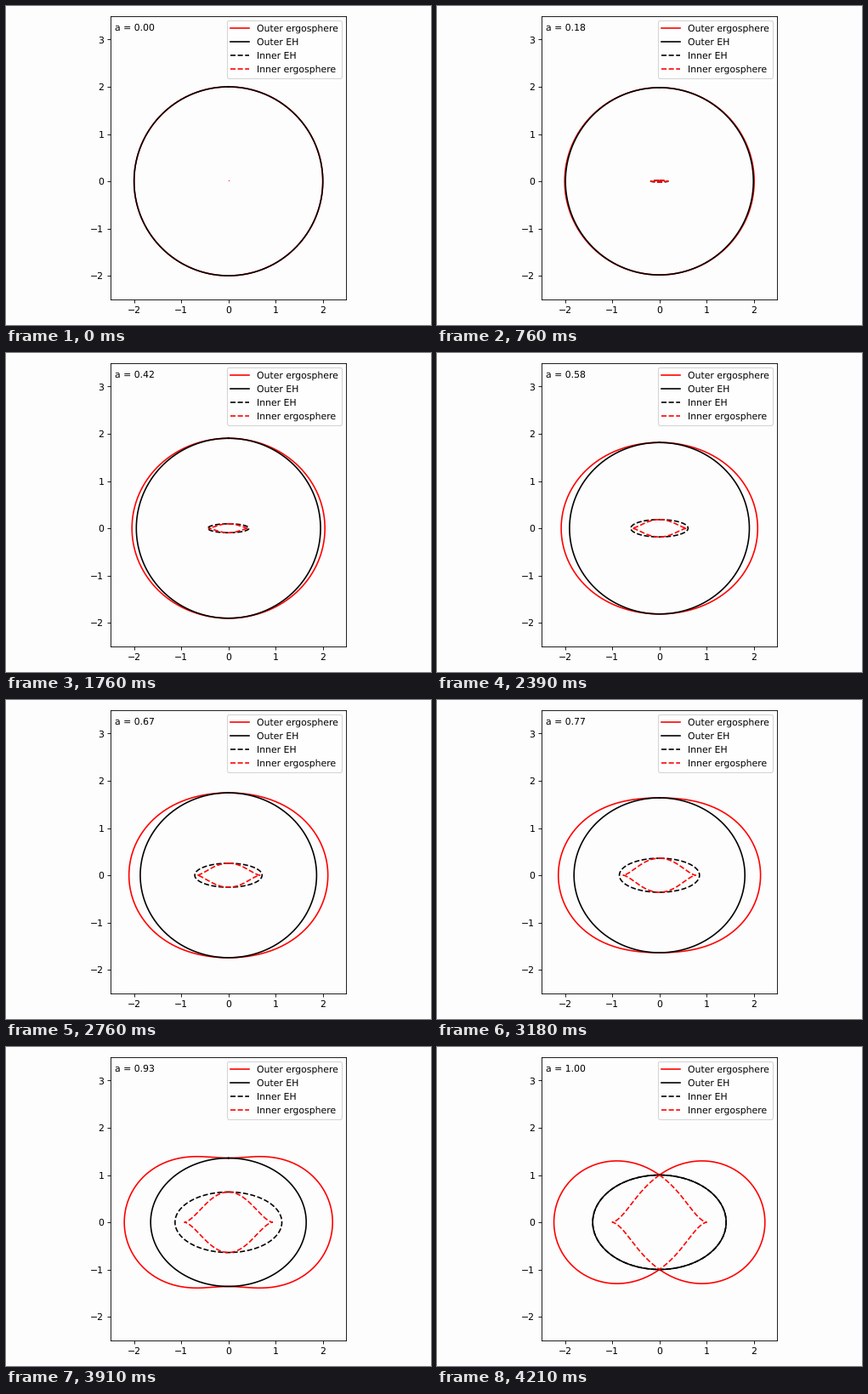
Write a matplotlib script that moves like this. It is 500 px wide and 375 px high and loops after 5000 ms.

```python
import numpy as np
import matplotlib.pyplot as plt
from matplotlib.animation import FuncAnimation

W, H, DPI = 500, 375, 78.125
LOOP_MS, INTERVAL = 5000, 20
STEP_MS = 1000 / 33  # the spin advances 33 times a second
BACKGROUND = "#fdfdfd"

plt.rcParams["text.hinting"] = "none"

theta = np.linspace(0, 2 * np.pi, 1000)

fig = plt.figure(figsize=(W / DPI, H / DPI), dpi=DPI, facecolor=BACKGROUND)
ax = fig.add_axes([122.9 / W, 30.2 / H, 277.57 / W, 333.08 / H],
                  facecolor=BACKGROUND)
ax.set_xlim(-2.5, 2.5)
ax.set_ylim(-2.5, 3.5)
ax.set_xticks(range(-2, 3))
ax.set_yticks(range(-2, 4))


def spin(step):
    """Spin rises steadily, slows a little near the end, then holds at 1."""
    return np.interp(step, [0, 112, 139], [0, 0.82, 1])


def surface(a, sign, ergo):
    """Kerr horizon or ergosphere (M = 1) in Cartesian coordinates."""
    c = np.cos(theta) if ergo else np.ones_like(theta)
    r = 1 + sign * np.sqrt(np.maximum(1 - (a * c) ** 2, 0))
    return np.hypot(r, a) * np.sin(theta), r * np.cos(theta)


# label, colour, line style, sign of the root, ergosphere or horizon
SURFACES = [
    ("Outer ergosphere", "red", "-", 1, True),
    ("Outer EH", "black", "-", 1, False),
    ("Inner EH", "black", "--", -1, False),
    ("Inner ergosphere", "red", "--", -1, True),
]

lines = [ax.plot([], [], color=color, ls=style, lw=1.5, label=name)[0]
         for name, color, style, _, _ in SURFACES]
dot, = ax.plot(0, 0, "r,")
label = ax.text(-2.4, 3.2, "")
ax.legend(loc="upper right")


def update(i):
    # sample just past the middle of the frame, where steps round to
    a = spin((i * INTERVAL + 15) // STEP_MS)
    for line, (_, _, _, sign, ergo) in zip(lines, SURFACES):
        line.set_data(*surface(a, sign, ergo))
    dot.set_visible(a == 0)
    label.set_text(f"a = {a:.2f}")
    return [*lines, dot, label]


anim = FuncAnimation(fig, update, frames=LOOP_MS // INTERVAL,
                     interval=INTERVAL, init_func=lambda: update(0),
                     repeat=True, repeat_delay=0)
plt.show()
```
